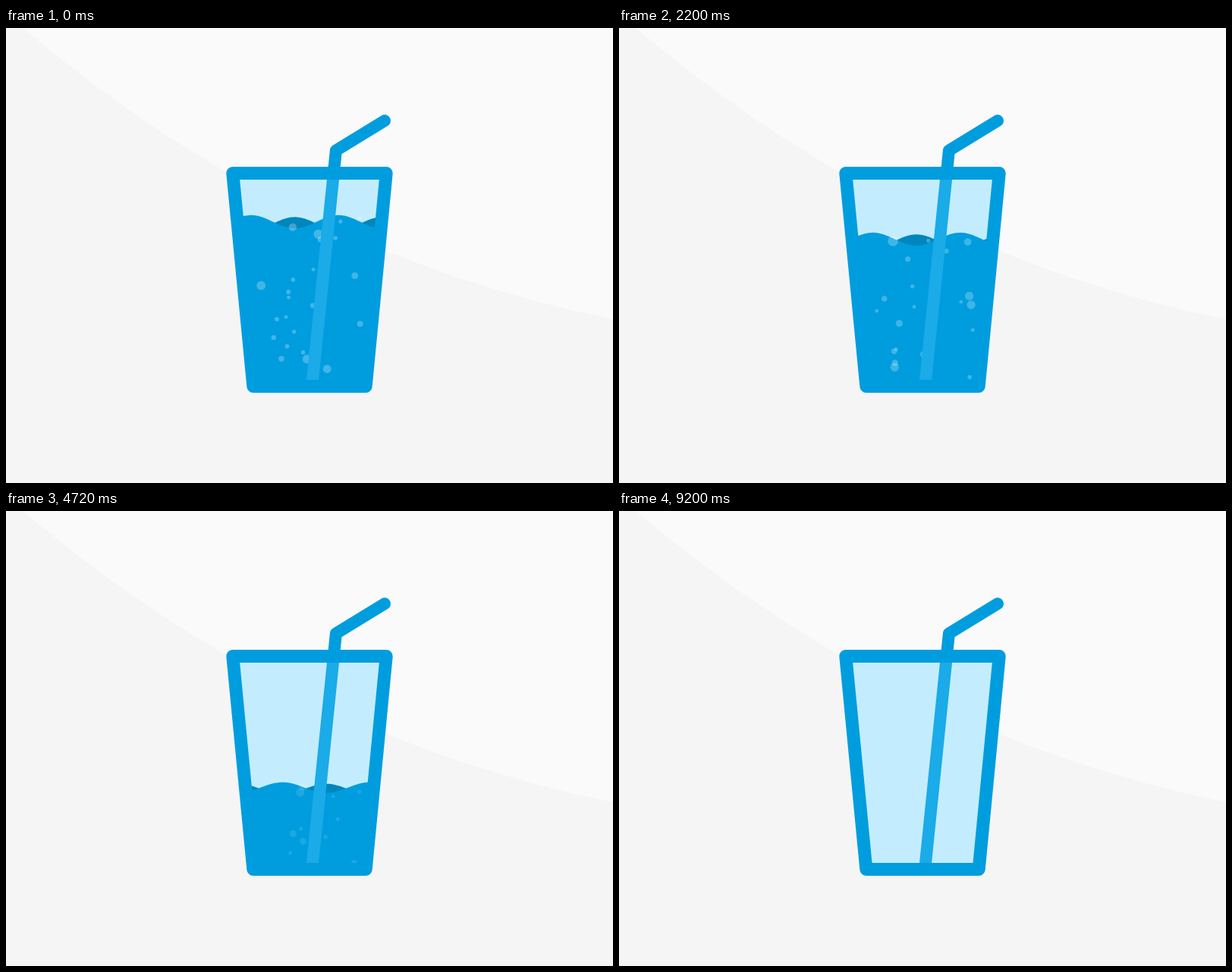
Write an HTML page with a canvas that moves like this. It is 800 by 600 pixels and loops after 10000 ms.

```html
<!DOCTYPE html>
<html lang="en">
<head>
<meta charset="utf-8">
<title>Emptying glass</title>
<style>
html, body { margin: 0; width: 100%; height: 100%; overflow: hidden; background: #f5f5f5; }
canvas { display: block; }
</style>
</head>
<body>
<canvas id="stage" width="800" height="600"></canvas>
<script>
const ctx = document.getElementById('stage').getContext('2d');
const LOOP = 10, FLOOR = 464;
const BLUE = '#009dde', DARK = '#0085bd', LIGHT = '#c3edff', STRAW = '#1aabe8';
const WAVELENGTH = 115, WAVE_SPEED = 57.5;

const backdrop = new Path2D('M22 0Q374 298 800 384V0Z');
const glass = new Path2D('M298.8 191.5H501.2L474.2 472.5H325.8Z');
const straw = new Path2D('M403.1 473L434.9 161.5L499 122.3');

const clamp = v => Math.max(0, Math.min(1, v));

let seed = 7;
function random() {
  seed = (seed * 16807) % 2147483647;
  return seed / 2147483647;
}

// Bubbles leave the floor at a steady rate; bigger ones rise faster.
const bubbles = Array.from({ length: 88 }, (_, i) => {
  const r = 2.4 + 4.4 * random() ** 2.5;
  return { x: 328 + 150 * random(), r, speed: 22 + 18 * r, born: -3.3 + 0.095 * i };
});

function fill(path, color) {
  ctx.fillStyle = color;
  ctx.fill(path);
}

function stroke(path, color, width) {
  ctx.strokeStyle = color;
  ctx.lineWidth = width;
  ctx.stroke(path);
}

function wave(t, middle, amplitude) {
  const path = new Path2D();
  for (let x = 290; x <= 510; x += 2) {
    const phase = (x - 323 - WAVE_SPEED * t) / WAVELENGTH;
    path.lineTo(x, middle - amplitude * Math.cos(2 * Math.PI * phase));
  }
  path.lineTo(510, 480);
  path.lineTo(290, 480);
  path.closePath();
  return path;
}

function drawBubbles(t, top) {
  ctx.fillStyle = `rgba(255, 255, 255, ${0.25 * clamp((6.8 - t) / 4.8)})`;
  for (const { x, r, speed, born } of bubbles) {
    const y = FLOOR + r - speed * (t - born);
    if (y < top || y > FLOOR + r) continue;
    ctx.beginPath();
    ctx.arc(x, y, r, 0, 2 * Math.PI);
    ctx.fill();
  }
}

function drawLiquid(t) {
  const drained = (1 - Math.cos(Math.PI * clamp((t - 0.39) / 8.5))) / 2;
  const middle = 255.5 + 212 * drained;
  const amplitude = 8.7 * (1 - clamp(t / 8.1) ** 3);
  fill(wave(t, middle + 2.5 * amplitude / 8.7, -amplitude), DARK);
  fill(wave(t, middle, amplitude), BLUE);
  drawBubbles(t, middle - amplitude / 2);
}

function draw(t) {
  ctx.fillStyle = '#f5f5f5';
  ctx.fillRect(0, 0, 800, 600);
  fill(backdrop, '#fafafa');
  stroke(straw, BLUE, 16);

  ctx.save();
  ctx.clip(glass);
  fill(glass, LIGHT);
  drawLiquid(t);
  stroke(straw, STRAW, 16);
  ctx.restore();

  stroke(glass, BLUE, 17);
}

ctx.lineCap = ctx.lineJoin = 'round';
const start = performance.now();

function tick() {
  draw((performance.now() - start) / 1000 % LOOP);
  requestAnimationFrame(tick);
}
tick();
</script>
</body>
</html>
```
